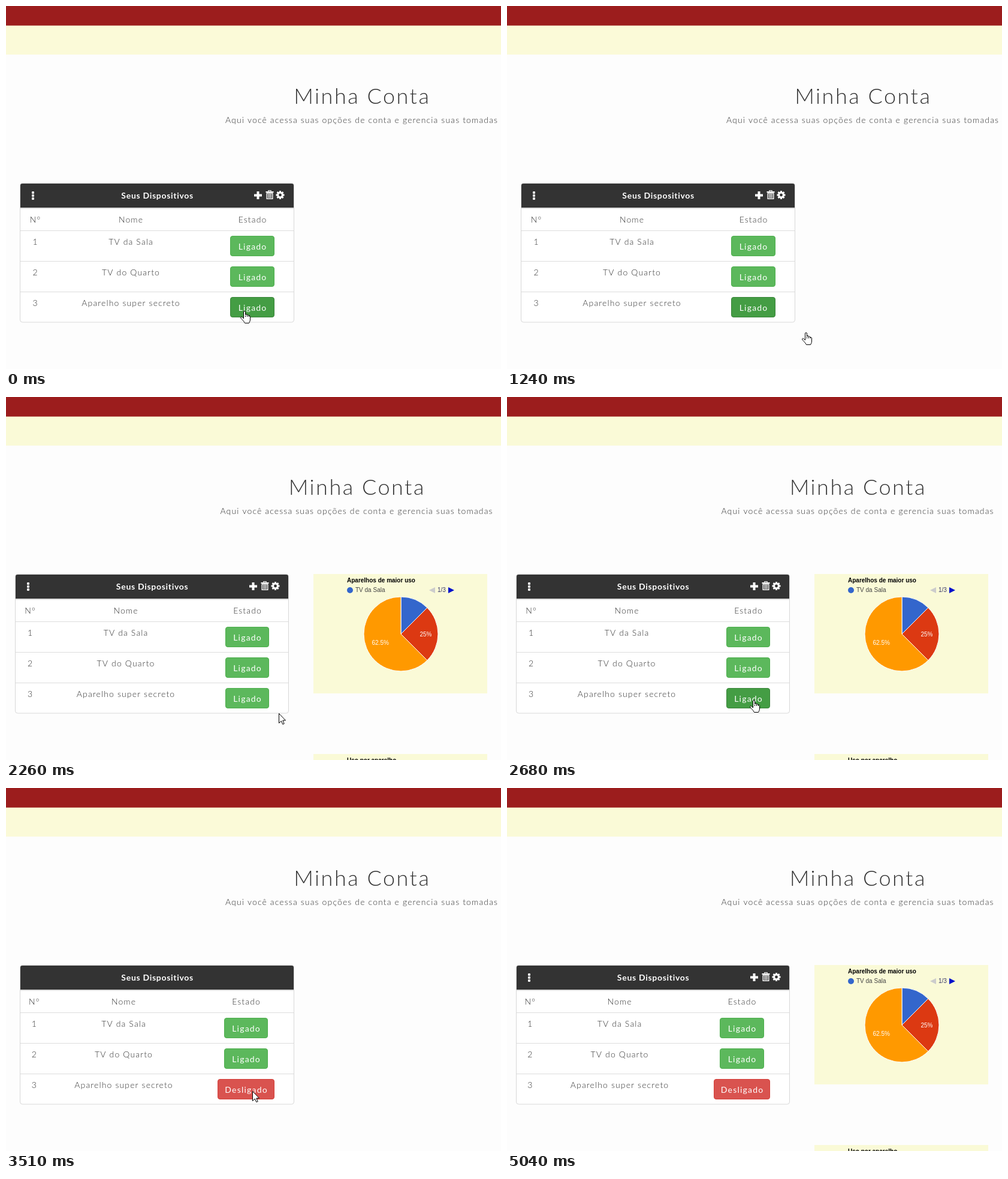
An HTML page with a canvas that plays this animation: 826 px wide and 605 px high, repeating every 5860 ms.

```html
<!DOCTYPE html>
<html lang="pt">
<head>
<meta charset="utf-8">
<title>Minha Conta</title>
<style>
html, body { margin: 0; width: 100%; height: 100%; overflow: hidden; background: #fdfdfd; }
canvas { display: block; }
</style>
</head>
<body>
<canvas id="stage" width="826" height="605"></canvas>
<script>
const ctx = document.getElementById('stage').getContext('2d');
const LOOP = 5860;
const SHIFT = -8.5; // page moves left when the scrollbar and charts appear
const LIGHT = '300 14px Lato, sans-serif';
const BUTTON = '400 14px Lato, sans-serif';
const SMALL = '10px "Liberation Sans", Arial, sans-serif';

const GREEN = ['#5cb85c', '#4cae4c'];
const HOVER = ['#449d44', '#398439'];
const ACTIVE = ['#398439', '#255625'];
const RED = ['#d9534f', '#d43f3a'];

const HAND = new Path2D('M5.5 13V2Q5.5 .5 7 .5T8.5 2V7Q8.5 5.5 10 5.5T11 7.5Q11.5 6.5 12.8 6.8T13.8 8.5Q15 7.5 16 8.6T16.5 11V15Q16.5 17 14.5 20.5H7.5Q6.5 18 3 14.5L.7 12Q.3 10.5 1.5 10T5.5 13Z');
const ARROW = new Path2D('M.5 .5V16.5L4.3 13L6.8 18.5L9.2 17.5L6.8 12H11.5Z');

// time, shape, left, top
const POINTER = [
  [0, HAND, 391, 508],
  [1090, HAND, 447, 522],
  [1240, HAND, 492, 544],
  [1360, ARROW, 502, 544],
  [1830, ARROW, 497, 544],
  [1980, ARROW, 476, 538],
  [2130, ARROW, 464, 532],
  [2260, ARROW, 455, 527],
  [2410, HAND, 424, 515],
  [2530, HAND, 401, 506],
  [2680, HAND, 405, 505],
  [3240, ARROW, 411, 505],
  [3790, ARROW, 474, 526],
  [3920, ARROW, 537, 548],
  [4060, ARROW, 643, 569],
  [4210, ARROW, 718, 589],
  [4330, null, 0, 0]
];

function rect(x, y, w, h, color) {
  ctx.fillStyle = color;
  ctx.fillRect(x, y, w, h);
}

function disc(x, y, r, color) {
  ctx.fillStyle = color;
  ctx.beginPath();
  ctx.arc(x, y, r, 0, Math.PI * 2);
  ctx.fill();
}

function poly(points, color) {
  ctx.fillStyle = color;
  ctx.beginPath();
  points.forEach(([x, y]) => ctx.lineTo(x, y));
  ctx.fill();
}

function text(str, x, y, font, color, spacing = 0, align = 'left') {
  ctx.font = font;
  ctx.letterSpacing = spacing + 'px';
  ctx.textAlign = align;
  ctx.fillStyle = color;
  ctx.fillText(str, align === 'center' ? x + spacing / 2 : x, y);
}

const label = (str, x, y) => text(str, x, y, LIGHT, '#333', 1.13, 'center');

function button(str, left, right, top, [fill, edge]) {
  const x = Math.round(left), w = Math.round(right) - x;
  ctx.beginPath();
  ctx.roundRect(x + 0.5, top + 0.5, w - 1, 33, 3.5);
  ctx.fillStyle = fill;
  ctx.fill();
  ctx.strokeStyle = edge;
  ctx.lineWidth = 1;
  ctx.stroke();
  text(str, (left + right) / 2, top + 23, BUTTON, '#fff', 1.2, 'center');
}

function trash(x, y) {
  rect(x + 4, y, 5, 1, '#fff');
  rect(x + 4, y, 1, 2, '#fff');
  rect(x + 8, y, 1, 2, '#fff');
  rect(x, y + 2, 13, 2, '#fff');
  ctx.strokeStyle = '#fff';
  ctx.lineWidth = 1.4;
  ctx.strokeRect(x + 1.7, y + 5, 9.6, 9.3);
  for (let i = 0; i < 3; i++) rect(x + 3.7 + i * 2.2, y + 6, 1.2, 7, '#fff');
}

function gear(x, y) {
  ctx.save();
  ctx.translate(x, y);
  for (let i = 0; i < 8; i++) {
    rect(-1.5, -7, 3, 4, '#fff');
    ctx.rotate(Math.PI / 4);
  }
  ctx.restore();
  disc(x, y, 5.4, '#fff');
  disc(x, y, 2.4, '#333');
}

function icons(dx) {
  const x = Math.round(dx);
  for (const y of [309, 314, 319]) {
    ctx.fillStyle = '#fff';
    ctx.beginPath();
    ctx.roundRect(43 + x, y, 4, 4, 1.3);
    ctx.fill();
  }
  rect(414 + x, 313.5, 13, 4, '#fff');
  rect(418.5 + x, 309, 4, 13, '#fff');
  trash(433.5 + x, 307);
  gear(457.5 + x, 315);
}

function card(t, dx, off) {
  const left = Math.round(23.4 + dx), right = Math.round(480.8 + dx), w = right - left;
  ctx.beginPath();
  ctx.roundRect(left + 0.5, 295.5, w - 1, 231.5, 4);
  ctx.fillStyle = '#fff';
  ctx.fill();
  ctx.strokeStyle = '#d8d8d8';
  ctx.lineWidth = 1;
  ctx.stroke();

  ctx.fillStyle = '#333';
  ctx.beginPath();
  ctx.roundRect(left + 1, 296, w - 2, 40, [3, 3, 0, 0]);
  ctx.fill();
  rect(left + 1, 336, w - 2, 2, '#ddd');
  for (const y of [374, 425, 476]) rect(left + 1, y, w - 2, 1, '#ddd');

  text('Seus Dispositivos', 252.3 + dx, 321, '700 14px Lato, sans-serif', '#fff', 0.7, 'center');
  if (t < 3510 || t >= 3790) icons(dx);

  const [num, name, state] = (off ? [46.8, 196, 400.5] : [48.5, 208, 411]).map(x => x + dx);
  label('Nº', num, 361);
  label('Nome', name, 361);
  label('Estado', state, 361);

  let last = GREEN;
  if (t < 1360 || t >= 2410) last = HOVER;
  if (t >= 3110 && t < 3240) last = ACTIVE;

  ['TV da Sala', 'TV do Quarto', 'Aparelho super secreto'].forEach((str, i) => {
    const y = 398 + i * 51;
    label(i + 1, num, y);
    label(str, name, y);
    const top = y - 15;
    if (off && i === 2) button('Desligado', state - 47.3, state + 47.3, top, RED);
    else button('Ligado', state - 36.8, state + 36.8, top, i === 2 ? last : GREEN);
  });
}

function slice(from, to, color) {
  const turn = a => (a - 0.25) * Math.PI * 2;
  ctx.beginPath();
  ctx.moveTo(659, 395);
  ctx.arc(659, 395, 62, turn(from), turn(to));
  ctx.closePath();
  ctx.fillStyle = color;
  ctx.fill();
  ctx.strokeStyle = '#fff';
  ctx.lineWidth = 1;
  ctx.stroke();
}

function charts() {
  const panel = '#fafad7';
  rect(513, 295, 290, 199, panel);
  text('Aparelhos de maior uso', 569, 309, 'bold ' + SMALL, '#000');
  disc(574, 322, 5, '#3366cc');
  text('TV da Sala', 583, 325, SMALL, '#444');
  poly([[716, 317], [716, 327], [706, 322]], '#ccc');
  text('1/3', 720, 325, SMALL, '#3a3a6a');
  poly([[738, 317], [738, 327], [748, 322]], '#0011cc');

  slice(0, 0.125, '#3366cc');
  slice(0.125, 0.375, '#dc3912');
  slice(0.375, 1, '#ff9900');
  text('25%', 690.5, 398.5, SMALL, '#fff');
  text('62.5%', 610.5, 412.5, SMALL, '#fff');

  rect(513, 595, 290, 10, panel);
  text('Uso por aparelho', 569, 609, 'bold ' + SMALL, '#000');
}

function pointer(t) {
  const [, shape, x, y] = POINTER.findLast(p => t >= p[0]);
  if (!shape) return;
  ctx.save();
  ctx.translate(x, y);
  ctx.fillStyle = '#fff';
  ctx.fill(shape);
  ctx.strokeStyle = '#000';
  ctx.lineWidth = 1;
  ctx.stroke(shape);
  if (shape === HAND) {
    for (const kx of [8, 11, 14]) rect(kx, 8, 1, 2, '#000');
  }
  ctx.restore();
}

function draw(t) {
  const wide = (t >= 1360 && t < 3510) || t >= 5040;
  const dx = wide ? SHIFT : 0;
  rect(0, 0, 826, 605, '#fdfdfd');
  rect(0, 32, 826, 49, wide ? '#fafad7' : '#fbfad8');
  rect(0, 0, 826, 32.6, '#9c1d1d');
  text('Minha Conta', 593 + dx, 163, '300 36px Lato, sans-serif', '#333', 2.5, 'center');
  text('Aqui você acessa suas opções de conta e gerencia suas tomadas',
    593 + dx, 195, LIGHT, '#333', 1.13, 'center');
  card(t, dx, t >= 3510);
  if (wide) charts();
  pointer(t);
}

const start = performance.now();
function tick() {
  draw((performance.now() - start) % LOOP);
  requestAnimationFrame(tick);
}
tick();
</script>
</body>
</html>
```
